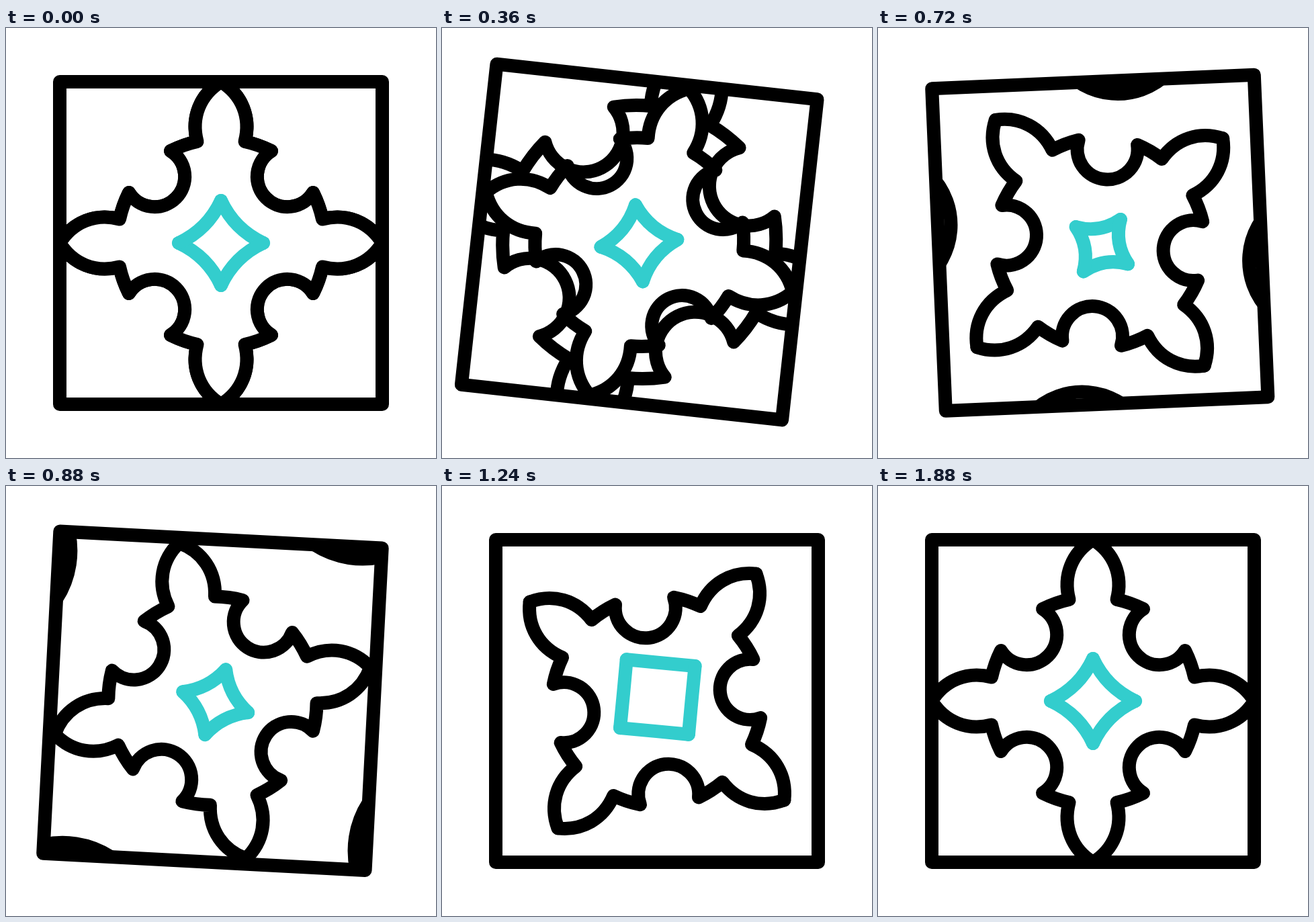
An HTML page with a canvas that plays this animation: 640x640 px, repeating every 2 s.

```html
<!DOCTYPE html>
<html lang="en">
<head>
<meta charset="utf-8">
<title>Swinging ornament tile</title>
<style>
  html, body { margin: 0; height: 100%; overflow: hidden; background: #fff; }
  canvas { display: block; width: 100vmin; height: 100vmin; }
</style>
</head>
<body>
<canvas width="640" height="640"></canvas>
<script>
const ctx = document.querySelector('canvas').getContext('2d');
const LOOP = 2000, STEP = 40, LINE = 20;

// One quarter of the ornament, from the top tip to the right tip
const quarter = 'M0-240C31-221 45-187 35.5-151Q56-146.5 75-137' +
  'A45 45 0 1 0 137-75Q146.5-56 151-35.5C187-45 221-31 240 0';
const edge = new Path2D(quarter);
const wedge = new Path2D(quarter + 'L0 0Z');

// Keys are [time, ...values], eased in and out between neighbours
const swingKeys = [[80, 0], [320, 7], [600, -6], [880, 3], [1160, 0]];
const spinKeys = [[80, 0], [1880, 180]];
const growKeys = [[80, 1], [1720, 5]];
// tip distance, waist, offset x, offset y, twist
const starKeys = [
  [80, 63, 20, 0, 0, 0],
  [760, 47.4, 12.7, -1.4, 4.8, 0],
  [1280, 72.8, 36.4, 4.3, 4.3, -1.7],
  [1880, 63, 20, 0, 0, 0]
];

function sample(keys, t) {
  const next = keys.findIndex(k => k[0] > t);
  if (next === 0) return keys[0].slice(1);
  if (next < 0) return keys[keys.length - 1].slice(1);
  const a = keys[next - 1], b = keys[next];
  const u = (t - a[0]) / (b[0] - a[0]);
  const e = u * u * (3 - 2 * u);
  return a.slice(1).map((v, i) => v + (b[i + 1] - v) * e);
}

function turn(degrees) {
  ctx.rotate(degrees * Math.PI / 180);
}

function fourTimes(draw) {
  for (let i = 0; i < 4; i++) {
    draw();
    turn(90);
  }
}

function ornament(angle, scale, filled) {
  ctx.save();
  turn(angle);
  ctx.scale(scale, scale);
  ctx.lineWidth = LINE / scale;
  if (filled) fourTimes(() => ctx.fill(wedge));
  fourTimes(() => ctx.stroke(edge));
  ctx.restore();
}

function star(angle, [tip, waist, x, y, twist]) {
  ctx.save();
  turn(angle);
  ctx.translate(x, y);
  turn(twist);
  ctx.strokeStyle = '#33cdcd';
  const side = new Path2D(`M0 ${-tip}Q${waist} ${-waist} ${tip} 0`);
  fourTimes(() => ctx.stroke(side));
  ctx.restore();
}

function render(t) {
  const [swing] = sample(swingKeys, t);
  const [spin] = sample(spinKeys, t);
  const [grow] = sample(growKeys, t);

  ctx.fillStyle = '#fff';
  ctx.strokeStyle = '#000';
  ctx.lineWidth = LINE;
  ctx.lineCap = ctx.lineJoin = 'round';
  ctx.fillRect(0, 0, 640, 640);

  ctx.save();
  // The tile hangs from the middle of its top edge
  ctx.translate(320, 80);
  turn(swing);
  ctx.translate(0, 240);

  ctx.save();
  ctx.beginPath();
  ctx.rect(-240, -240, 480, 480);
  ctx.clip();
  ornament(spin, grow, false);
  ctx.restore();

  ornament(spin, 1, true);
  star(-spin, sample(starKeys, t));
  ctx.strokeRect(-240, -240, 480, 480);
  ctx.restore();
}

function tick() {
  const t = performance.now() % LOOP;
  render(Math.floor(t / STEP) * STEP);
  requestAnimationFrame(tick);
}
tick();
</script>
</body>
</html>
```
